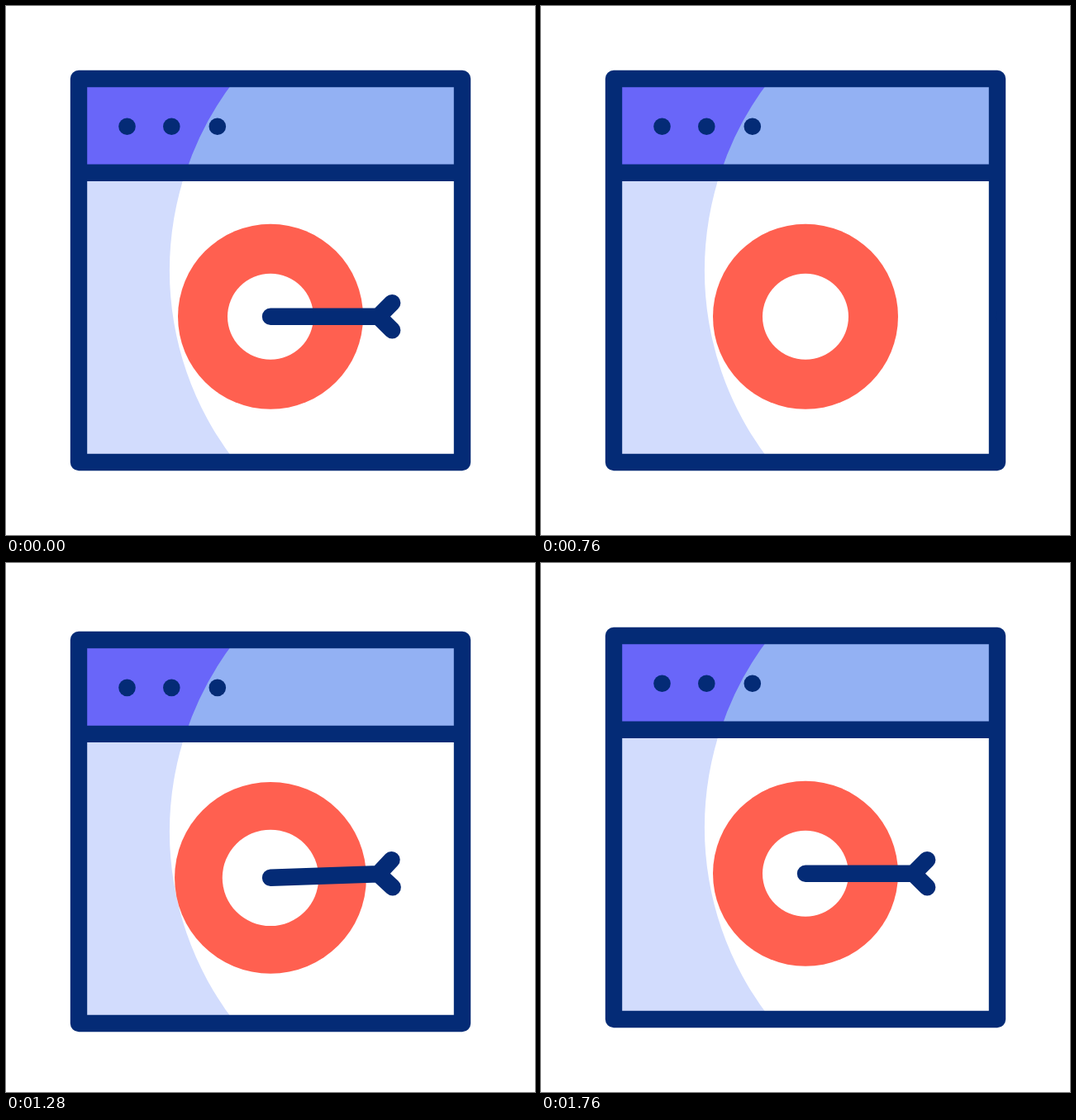
An HTML page for the animation above (1.84 s loop, 640 by 640 pixels).

```html
<!DOCTYPE html>
<html lang="en">
<head>
<meta charset="utf-8">
<title>Browser target</title>
<style>
  html, body { margin: 0; height: 100%; overflow: hidden; background: #fff; }
  svg { display: block; width: 100%; height: 100%; }
  .line { fill: none; stroke: #042b76; stroke-width: 20.4; stroke-linecap: round; stroke-linejoin: round; }
</style>
</head>
<body>
<svg viewBox="0 0 640 640">
  <clipPath id="inside"><rect x="88" y="88" width="464" height="464"/></clipPath>
  <g id="page">
    <path fill="#d2dcfd" d="M88 88H278A376 376 0 0 0 278 552H88Z"/>
    <path fill="#93b1f3" d="M88 88H552V202H88Z"/>
    <path fill="#6966f9" d="M88 88H278A376 376 0 0 0 217.2 202H88Z"/>
    <g fill="#042b76">
      <circle cx="146.5" cy="145.8" r="10.3"/>
      <circle cx="200.3" cy="145.8" r="10.3"/>
      <circle cx="255.8" cy="145.8" r="10.3"/>
    </g>
    <circle id="ring" cx="320" cy="375.8" r="112" fill="#ff6050"/>
    <circle id="hole" cx="320" cy="375.8" r="52" fill="#fff"/>
    <path class="line" d="M88 88H552V552H88ZM88 201.8H552"/>
    <g clip-path="url(#inside)">
      <path id="arrow" class="line" d="M0 0H450.5M0 0"/>
    </g>
  </g>
</svg>
<script>
  const LOOP = 1840;
  const [page, ring, hole, arrow] = ['page', 'ring', 'hole', 'arrow'].map(id => document.getElementById(id));
  arrow.setAttribute('d', 'M0 0H130.5L147.2 -16.6M130.5 0L147.2 16.6');

  const progress = (t, from, to) => Math.min(1, Math.max(0, (t - from) / (to - from)));
  const ease = u => u * u * (3 - 2 * u);
  // Rises from start to peak, then falls back over the same time.
  const pulse = (t, start, peak) => ease(1 - Math.min(1, Math.abs(t - peak) / (peak - start)));

  function arrowPose(t) {
    if (t < 720) {
      const fall = (Math.max(0, t - 120) / 200) ** 2;
      return { x: 0, y: 25.5 * fall, turn: 8 * fall };
    }
    return {
      x: 240 * (1 - ease(progress(t, 780, 1080))),
      y: 0,
      turn: -2.35 * Math.sin(Math.PI * progress(t, 1070, 1730))
    };
  }

  function draw(t) {
    const { x, y, turn } = arrowPose(t);
    page.setAttribute('transform', `translate(0 ${7.2 * pulse(t, 1070, 1400)})`);
    arrow.setAttribute('transform', `translate(${320 + x} ${375.7 + y}) rotate(${turn})`);
    hole.setAttribute('r', 52 + 10.2 * pulse(t, 1120, 1400));
    ring.setAttribute('r', 112 + 19.5 * pulse(t, 1200, 1480));
  }

  function tick() {
    draw(performance.now() % LOOP);
    requestAnimationFrame(tick);
  }
  tick();
</script>
</body>
</html>
```
